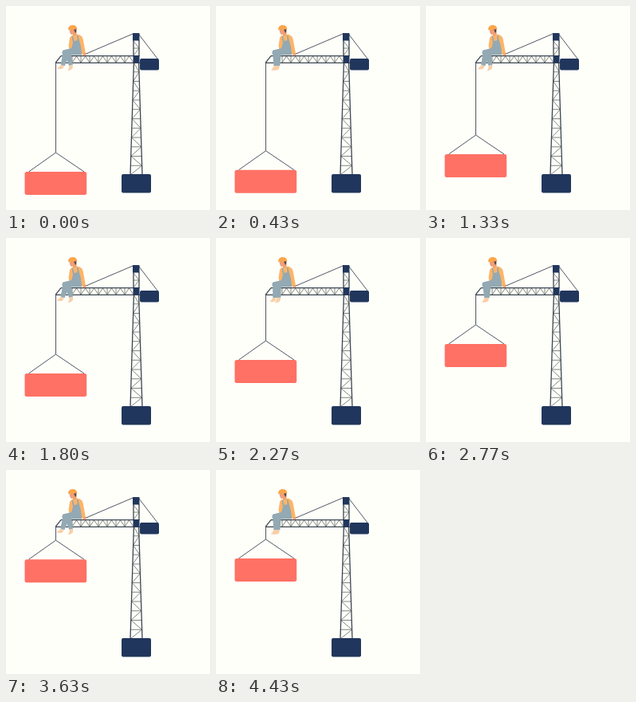
An HTML page that plays this animation: 256 px wide and 256 px high, repeating every 4460 ms.

```html
<!DOCTYPE html>
<html lang="en">
<head>
<meta charset="utf-8">
<title>Crane lift</title>
<style>
  html, body { margin: 0; width: 100%; height: 100%; overflow: hidden; background: #fffffa; }
  svg { display: block; width: 100vw; height: 100vh; }
  .line { fill: none; stroke: #3c4650; stroke-width: .9; stroke-linejoin: round; }
  .beam { stroke-width: 1.3; }
  .brace { stroke: #626860; stroke-width: .8; }
  .navy { fill: #21365c; }
  .shirt { fill: #fdb467; }
  .denim { fill: #93a9b3; }
  .skin { fill: #f0a077; }
</style>
</head>
<body>
<svg viewBox="0 0 256 256">
  <defs>
    <g id="shank">
      <path class="denim" d="M-4 -2Q-1 -5 4 -3L4.5 1 3 15H-2.2Z"/>
      <path d="M-2 15H2.4L2 17.5Q1.6 20 -1 20.4L-5 21Q-5.4 19.4 -3.6 18.4Z" fill="#f8cfa8"/>
    </g>
  </defs>

  <g id="crane">
    <path class="line brace" d="M160 44L167 53 160 62M160 53H167"/>
    <path class="line brace" id="jib"/>
    <path class="line brace" id="mast"/>
    <path class="line" d="M159 35L98 61M167 36L190 66"/>
    <path class="line beam" d="M62 71.3H168M69 62.7H161M62 71.3L69 62.7"/>
    <path class="line beam" d="M160.4 71L156 212M166.6 71L171 212M160 43V63M167 43V63"/>
    <rect class="navy" x="159" y="34" width="8.5" height="9.5"/>
    <rect class="navy" x="159.5" y="62" width="8" height="9.5"/>
    <rect class="navy" x="168" y="66" width="24" height="14.5" rx="2"/>
    <rect class="navy" x="145" y="211" width="37" height="23.5" rx="2"/>
  </g>

  <path class="line" id="rope"/>
  <g id="load">
    <path class="line" d="M28.5 0L62.5 -24 98 0"/>
    <rect x="23.5" width="77.7" height="29" rx="2.5" fill="#ff7164"/>
  </g>

  <g id="worker">
    <use href="#shank" id="far"/>
    <path class="shirt" d="M80 40Q82 36 88 35.5Q95 35.5 96.5 41L100 59.5 97.5 62 92 58H80L78.5 50Z"/>
    <path class="denim" d="M82.5 38H84L85.5 44 89.5 43 89 37H90.5L92 44Q95 52 95 61.5H80L72 62Q69 59 71.5 55.5L82 53 84 46Z"/>
    <path class="skin" d="M97 59.5L99.8 59 100.5 61.5 98 62.5ZM83 33L88.5 32 88.5 36 84.5 38Z"/>
    <path class="skin" d="M79.5 28.5L87 27.5Q89 33 86 35L82 36Q79.5 34 79.5 28.5Z"/>
    <path d="M85 29.5L88.4 28.5Q89 32.4 87 34Z" fill="#5c4640"/>
    <path d="M78 30Q77.8 25 82.5 24Q88.6 23.3 89.4 29L84 29.4Z" fill="#fba64a"/>
    <use href="#shank" id="near"/>
  </g>
</svg>
<script>
  const LOOP = 4460, SWING = 595;
  const $ = id => document.getElementById(id);

  // Lattice braces
  let d = "";
  for (let i = 0; i < 7; i++) {
    const x = 83 + i * 11;
    d += `M${x} 71V63M${x} 71L${x + 5.5} 63 ${x + 11} 71`;
  }
  $("jib").setAttribute("d", d);

  const left = y => 160.4 - (y - 71) * 4.4 / 141;
  const right = y => 327 - left(y);
  d = "";
  for (let i = 0; i < 12; i++) {
    const y = 71 + i * 11.75, b = y + 11.75;
    const [from, to] = i % 2 ? [right, left] : [left, right];
    d += `M${left(b)} ${b}H${right(b)}M${from(y)} ${y}L${to(b)} ${b}`;
  }
  $("mast").setAttribute("d", d);

  // Load height over time, joined by a monotone cubic
  const keys = [[0, 208], [870, 200.4], [1330, 186], [2270, 153], [2770, 133], [3630, 112.2], [4100, 111.2], [LOOP, 111]];
  const slope = i => (keys[i + 1][1] - keys[i][1]) / (keys[i + 1][0] - keys[i][0]);
  const tangents = keys.map((_, i) => {
    if (!i || i === keys.length - 1) return 0;
    const a = slope(i - 1), b = slope(i);
    return 2 * a * b / (a + b);
  });

  function loadY(t) {
    let i = 0;
    while (i < keys.length - 2 && t >= keys[i + 1][0]) i++;
    const [t0, y0] = keys[i], [t1, y1] = keys[i + 1];
    const h = t1 - t0, u = (t - t0) / h, v = 1 - u;
    return y0 * (1 + 2 * u) * v * v + y1 * u * u * (3 - 2 * u)
      + h * u * v * (tangents[i] * v - tangents[i + 1] * u);
  }

  function draw(now) {
    const t = now % LOOP, y = loadY(t);
    $("load").setAttribute("transform", `translate(0 ${y})`);
    $("rope").setAttribute("d", `M62.5 71V${y - 24}`);
    const a = 8 + 10 * Math.cos(2 * Math.PI * (t - 55) / SWING);
    $("near").setAttribute("transform", `translate(75 60) rotate(${a})`);
    $("far").setAttribute("transform", `translate(77 60) rotate(${-a})`);
  }

  const start = performance.now();
  (function tick() {
    draw(performance.now() - start);
    requestAnimationFrame(tick);
  })();
</script>
</body>
</html>
```
